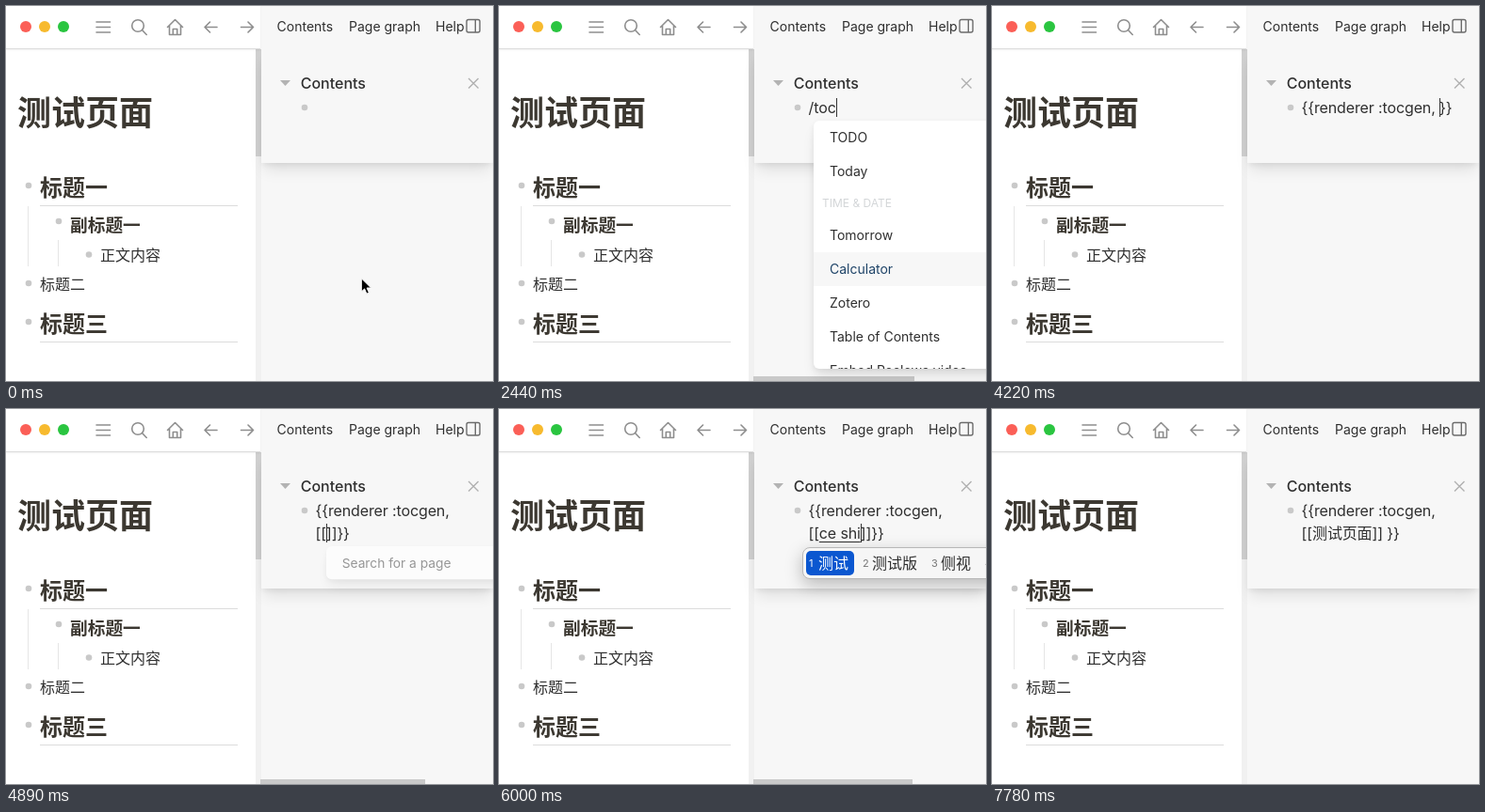
Animation of 517 by 399 pixels, one loop 8000 ms. Source, as an HTML page:

```html
<!DOCTYPE html>
<html lang="zh-CN">
<head>
<meta charset="utf-8">
<title>Contents sidebar</title>
<style>
html, body { margin: 0; width: 100%; height: 100%; overflow: hidden; }
#stage {
  position: relative; width: 517px; height: 399px; overflow: hidden; background: #f7f7f7;
  color: #2f2f2f; font-family: Inter, "Noto Sans CJK SC", "Noto Sans CJK", sans-serif;
}
#stage div, #stage svg { position: absolute; white-space: pre; }
svg { left: 0; top: 0; width: 517px; height: 399px; }
#page { left: 0; top: 0; width: 265px; height: 399px; background: #fff; }
#top { left: 0; top: 0; width: 270px; height: 45px; background: #fff;
  border-bottom: 1px solid #dcdcdc; box-shadow: 0 1px 2px rgba(0,0,0,.06); }
#track { left: 264.5px; top: 46px; width: 6px; height: 353px; background: #f1f1f1; }
#thumb { width: 6px; height: 114px; background: #cfcfcf; }
#card { left: 271px; top: 50px; width: 246px; height: 117px; background: #f7f7f7;
  box-shadow: 0 10px 15px -3px rgba(0,0,0,.1), 0 4px 6px -2px rgba(0,0,0,.07); }
#cover { left: 271px; top: 0; width: 246px; height: 66px; background: #f7f7f7; }
#bar { left: 270px; top: 394px; height: 5px; background: #c9c9c9; }
#entry { left: 328.6px; top: 96px; font-size: 16px; line-height: 24px; letter-spacing: -.13px; }
#entry i { position: absolute; width: 1px; height: 20px; margin-top: 2px; background: #333; }
#entry u { text-decoration: underline 1px; text-underline-offset: 3px; text-decoration-skip-ink: none; }
.popup { width: 240px; max-height: 264px; overflow: hidden; background: #fff; border-radius: 6px;
  box-shadow: 0 10px 15px -3px rgba(0,0,0,.1), 0 2px 6px rgba(0,0,0,.07);
  transform-origin: 0 0; font-size: 14px; }
#stage .popup div { position: static; height: 36px; line-height: 36px; padding-left: 17px; }
#stage .popup .head { height: 32px; line-height: 32px; padding-left: 9px; font-size: 12px; color: #d3d6d8; }
.popup .hover { background: #f7f7f7; color: #1f4468; }
.popup .pick { background: #f7f7f7; }
.popup .hint { color: #606060; }
#ime { left: 322px; top: 147px; width: 230px; height: 32px; background: #f6f6f6;
  border: 1px solid #b8b8b8; border-radius: 8px; box-shadow: 0 6px 18px rgba(0,0,0,.25); }
#pill { left: 3px; top: 2.5px; width: 51px; height: 26px; border-radius: 5px; background: #0b57d0; }
</style>
</head>
<body>
<div id="stage">
  <div id="page"></div>
  <div id="track"><div id="thumb"></div></div>
  <div id="top"></div>
  <div id="card"></div>
  <div id="cover"></div>
  <svg viewBox="0 0 517 399" fill="none">
    <circle cx="21" cy="22" r="6" fill="#fb5f57"/>
    <circle cx="41" cy="22" r="6" fill="#f7ba2e"/>
    <circle cx="61" cy="22" r="6" fill="#2ac540"/>
    <g stroke="#8e8e8e" stroke-width="1.6" stroke-linecap="round" stroke-linejoin="round">
      <path d="M96 17h14.500M96 22.500h14.500M96 28h14.500"/>
      <circle cx="140" cy="21" r="6.3"/>
      <path d="M144.700 25.700l4.500 4.800"/>
      <path d="M171.500 22.500l8-8 8 8M173.500 21v9.500h12V21M177.300 30.500v-6h4.400v6"/>
      <path d="M224 22.500h-13M216.500 17l-5.500 5.500 5.500 5.500"/>
      <path d="M249.500 22.500h13M257 17l5.500 5.500-5.500 5.500"/>
    </g>
    <g stroke="#6c6c6c" stroke-width="1.4">
      <rect x="489" y="14.500" width="14" height="13.500" rx="2"/>
      <path d="M498.300 14.500v13.500"/>
    </g>
    <path d="M491 77l10.500 10.500M501.500 77L491 87.500" stroke="#b0b0b0" stroke-width="1.4"/>
    <path d="M291 79h11l-5.500 6z" fill="#b3b3b3"/>
    <path d="M36 212.500h210M36 357.500h210" stroke="#dcdcdc"/>
    <path d="M23.500 213v64M55.500 249v28" stroke="#e6e6e6"/>
    <g id="dots" fill="#c9c9c9"></g>
  </svg>
  <div id="entry"></div>
  <div id="bar"></div>
  <div id="ime"><div id="pill"></div></div>
  <svg id="pointer" viewBox="0 0 517 399">
    <path d="M377.300 289.800v14.200l3.300-3.100 2.300 5.300 2.500-1.100-2.300-5.100h4.500z" fill="#000" stroke="#fff" stroke-width="1"/>
  </svg>
</div>
<script>
const LOOP = 8000, FRAME = 1000 / 9;
const $ = id => document.getElementById(id);
const stage = $("stage");

function add(parent, text, css, cls = "") {
  const el = document.createElement("div");
  el.textContent = text;
  el.className = cls;
  Object.assign(el.style, css);
  parent.append(el);
  return el;
}

// Places text by its left edge and its middle line.
function label(text, x, mid, size, weight = 400, color = "", parent = stage) {
  const css = { left: x + "px", top: mid - size + "px", fontSize: size + "px",
    lineHeight: size * 2 + "px", fontWeight: weight, color };
  return add(parent, text, css);
}

const HEADING = "#3c3831";
label("Contents", 287.6, 22, 14);
label("Page graph", 364, 22, 14);
label("Help", 456, 22, 14);
label("Contents", 312.7, 82, 16, 500);
label("测试页面", 12, 114, 36, 700, HEADING);
label("标题一", 36, 194, 24, 700, HEADING);
label("副标题一", 68, 233.5, 18.72, 700, HEADING);
label("正文内容", 100, 264.5, 16);
label("标题二", 36, 295.5, 16);
label("标题三", 36, 339, 24, 700, HEADING);

$("dots").innerHTML = [[24, 191], [56, 229], [88, 264.5], [24, 295], [24, 336], [317, 108]]
  .map(([x, y]) => `<circle cx="${x}" cy="${y}" r="3.3"/>`).join("");

const ime = $("ime");
ime.style.zIndex = 2;
[["1", 6], ["2", 63], ["3", 136], ["4", 193]].forEach(([n, x], i) =>
  label(n, x, 15.5, 11, 400, i ? "#777" : "#fff", ime));
[["测试", 16], ["测试版", 73], ["侧视", 146]].forEach(([word, x], i) =>
  label(word, x, 15.5, 16, 500, i ? "" : "#fff", ime));

// Row marks: # heading, > hovered, * picked, ? hint.
const KINDS = { "#": "head", ">": "hover", "*": "pick", "?": "hint" };

function popup(from, to, x, y, rows, enter) {
  const el = add(stage, "", { left: x + "px", top: y + "px" }, "popup");
  for (const row of rows) {
    const kind = KINDS[row[0]];
    add(el, kind ? row.slice(1) : row, {}, kind);
  }
  return { el, from, to, enter };
}

const basic = hovered => ["#BASIC", ...["Page reference", "Page embed", "Block reference",
  "Block embed", "Link", "Image link", "Underline"].map(s => s === hovered ? ">" + s : s)];

const popups = [
  popup(1330, 1550, 334, 122, basic("Link"), 1330),
  popup(1550, 2220, 334, 122, basic("Block embed"), 1330),
  popup(2220, 2560, 334, 122, ["TODO", "Today", "#TIME & DATE", "Tomorrow", ">Calculator",
    "Zotero", "Table of Contents", "Embed Reelowa video"]),
  popup(2560, 3670, 334, 122, ["*Table of Contents"]),
  popup(4890, 5560, 340, 146, ["?Search for a page"], 4810),
  popup(6330, 7560, 340, 146, ["*测试页面", "New page: 测试"])
];

// "|" is the caret; "_" opens the underlined part that ends at it.
const CALL = "{{renderer :tocgen,";
const entries = [
  [0, "|"], [1220, "/|"], [2000, "/t|"], [2110, "/to|"], [2440, "/toc|"],
  [3670, CALL + " }}|"], [4220, CALL + " |}}"],
  [4440, CALL + "\n[|]}}"], [4890, CALL + "\n[[|]]}}"],
  ...["c", "ce", "ce s", "ce sh", "ce shi"].map((s, i) => [5560 + i * 110, `${CALL}\n[[_${s}|]]}}`]),
  [6220, CALL + "\n[[测试|]]}}"], [7560, CALL + "\n[[测试页面]] }}|"]
];
const caretOff = [[0, 110], [560, 1000], [2890, 3330], [4110, 4220], [5330, 5560], [6670, 7220], [7560, 8000]];
const barWidths = [[0, 0], [1330, 174], [2220, 171], [3780, 0], [4890, 175], [5560, 169], [7780, 0]];

const at = (table, t) => table.findLast(([start]) => t >= start)[1];
const within = (t, from, to) => t >= from && t < to;
const show = (el, on) => { el.style.visibility = on ? "visible" : "hidden"; };

let shown = null;
function write(text) {
  if (text === shown) return;
  shown = text;
  $("entry").innerHTML = text.replace(/_(.*)\|/, "<u>$1</u>|").replace("|", "<i></i>");
}

function render(t) {
  const held = Math.floor(t / FRAME + 0.1) * FRAME;
  write(at(entries, t));
  show($("entry").querySelector("i"), !caretOff.some(([a, b]) => within(t, a, b)));
  $("card").style.height = (t < 4440 ? 117 : 141) + "px";
  $("bar").style.width = at(barWidths, t) + "px";
  show($("pointer"), t < 1220);
  show(ime, within(t, 5560, 6220));
  for (const { el, from, to, enter } of popups) {
    show(el, within(t, from, to));
    if (enter === undefined) continue;
    const p = Math.min(1, Math.max(0, (held - enter) / 200));
    const eased = 1 - (1 - p) ** 2;
    el.style.opacity = eased;
    el.style.transform = `scale(${0.95 + 0.05 * eased})`;
  }
}

const begin = performance.now();
function tick() {
  render((performance.now() - begin) % LOOP);
  requestAnimationFrame(tick);
}
tick();
</script>
</body>
</html>
```
